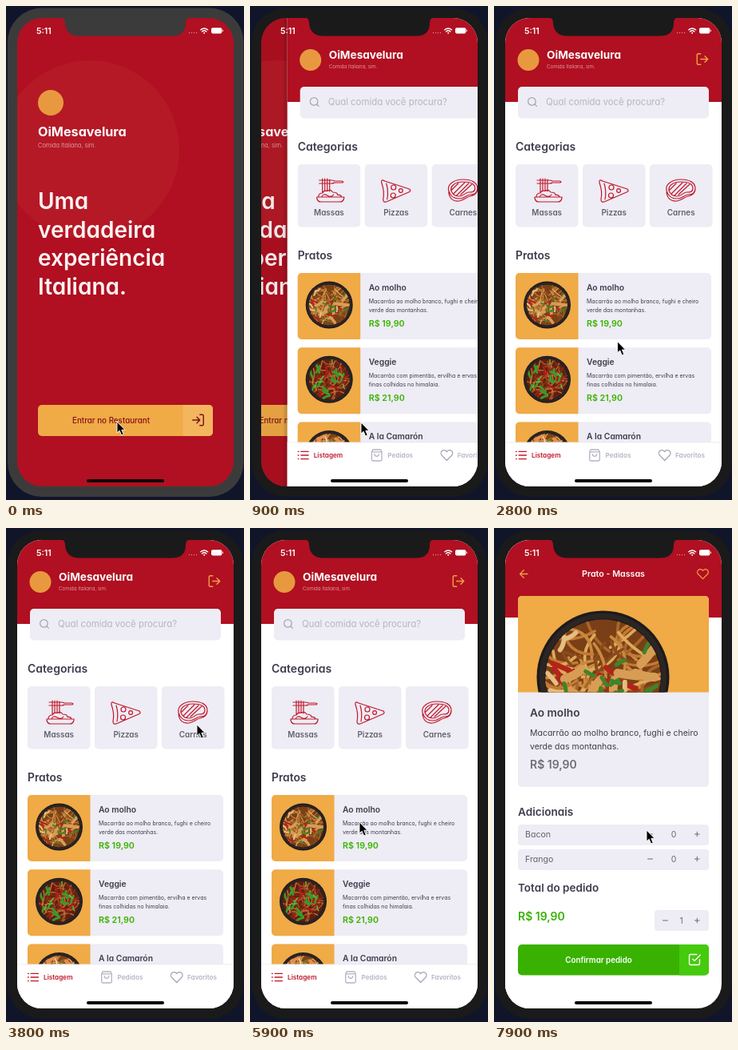
Animation of 298x618 px, one loop 8 s. Source, as an HTML page:

```html
<!DOCTYPE html>
<html lang="pt">
<head>
<meta charset="utf-8">
<title>App de restaurante</title>
<style>
  html, body { margin: 0; width: 100%; height: 100%; overflow: hidden; background: #10152a; }
  svg { display: block; width: 298px; height: 618px; }
  text { font-family: Inter, "Open Sans", sans-serif; font-feature-settings: "cv11"; white-space: pre; }
  .line { fill: none; stroke-linecap: round; stroke-linejoin: round; }
</style>
</head>
<body>
<svg id="stage" viewBox="0 0 298 618" xmlns="http://www.w3.org/2000/svg"></svg>
<script>
const LOOP = 8000, STEP = 100, WIDTH = 271;
const RED = '#b01021', ORANGE = '#f0aa46', GREEN = '#39b100', PANEL = '#eeecf4',
      INK = '#3d3d4d', MUTED = '#b7b4c4', GRAY = '#6a6874', ICON = '#c1182c', AMBER = '#ef9f45';
const BRAND = 'OiMesavelura', TAGLINE = 'Comida Italiana, sim.';

const text = (x, y, size, weight, fill, str, anchor = 'start') =>
  `<text x="${x}" y="${y}" font-size="${size}" font-weight="${weight}" fill="${fill}" text-anchor="${anchor}">${str}</text>`;
const rect = (x, y, w, h, fill, r = 0, extra = '') =>
  `<rect x="${x}" y="${y}" width="${w}" height="${h}" rx="${r}" fill="${fill}" ${extra}/>`;
const circle = (x, y, r, fill) => `<circle cx="${x}" cy="${y}" r="${r}" fill="${fill}"/>`;
const line = (d, color, width = 1.2) =>
  `<path class="line" d="${d}" stroke="${color}" stroke-width="${width}"/>`;

// Icons live on a 24-unit grid and are placed by their centre.
const ICONS = {
  enter: 'M15 3h4a2 2 0 0 1 2 2v14a2 2 0 0 1-2 2h-4M10 17l5-5-5-5M15 12H3',
  leave: 'M9 21H5a2 2 0 0 1-2-2V5a2 2 0 0 1 2-2h4M16 17l5-5-5-5M21 12H9',
  search: 'M19 11a8 8 0 1 1-16 0a8 8 0 0 1 16 0M21 21l-4.3-4.3',
  list: 'M8 5h14M8 12h14M8 19h14M2.5 5h1M2.5 12h1M2.5 19h1',
  bag: 'M5 2L3 6v14a2 2 0 0 0 2 2h14a2 2 0 0 0 2-2V6l-2-4zM3 6h18M16 10a4 4 0 0 1-8 0',
  heart: 'M20.8 4.6a5.5 5.5 0 0 0-7.8 0L12 5.7l-1-1.1a5.5 5.5 0 0 0-7.8 7.8L12 21.2l8.8-8.8a5.5 5.5 0 0 0 0-7.8z',
  back: 'M19 12H5M12 19l-7-7 7-7',
  check: 'M9 11l3 3L22 4M21 12v7a2 2 0 0 1-2 2H5a2 2 0 0 1-2-2V5a2 2 0 0 1 2-2h11'
};
const icon = (name, x, y, scale, color, width = 1.9) =>
  `<g transform="translate(${x} ${y}) scale(${scale}) translate(-12 -12)">${line(ICONS[name], color, width)}</g>`;

function random(seed) {
  return () => (seed = (seed * 16807) % 2147483647) / 2147483647;
}

// A dark bowl of noodles; chunks are [colour, count, length, thickness].
function bowl(id, cx, cy, r, seed, base, strands, chunks) {
  const rnd = random(seed);
  const spot = () => {
    const a = rnd() * Math.PI * 2, d = Math.sqrt(rnd()) * r * 0.8;
    return [cx + Math.cos(a) * d, cy + Math.sin(a) * d];
  };
  const stroke = (color, len, bend, width) => {
    const [x, y] = spot(), a = rnd() * Math.PI * 2;
    const dx = Math.cos(a) * len * r, dy = Math.sin(a) * len * r, k = (rnd() - 0.5) * bend;
    const n = v => v.toFixed(1);
    return line(`M${n(x - dx)} ${n(y - dy)}Q${n(x - dy * k)} ${n(y + dx * k)} ${n(x + dx)} ${n(y + dy)}`, color, n(width * r));
  };
  let out = '';
  for (let i = 0; i < 66; i++) out += stroke(strands[i % strands.length], 0.3, 2.2, 0.045);
  for (const [color, count, len, width] of chunks)
    for (let i = 0; i < count; i++) out += stroke(color, len, 0.8, width);
  return `<clipPath id="${id}"><circle cx="${cx}" cy="${cy}" r="${r * 0.87}"/></clipPath>` +
    circle(cx, cy, r, '#1d1a1a') +
    `<g clip-path="url(#${id})">${circle(cx, cy, r * 0.87, base)}${out}</g>` +
    `<circle cx="${cx}" cy="${cy}" r="${r * 0.92}" fill="none" stroke="#2b2524" stroke-width="${r * 0.08}"/>`;
}
const chickenBowl = (id, x, y, r) => bowl(id, x, y, r, 4127, '#7a3f16',
  ['#c98a3e', '#a9662a', '#dda95c', '#8a4a1b', '#c27a33'],
  [['#b3241a', 9, 0.13, 0.08], ['#d79d55', 9, 0.15, 0.13], ['#e6bd80', 6, 0.1, 0.07], ['#3e8428', 13, 0.07, 0.06]]);
const veggieBowl = (id, x, y, r) => bowl(id, x, y, r, 911, '#5f1f10',
  ['#b5562a', '#8a3318', '#c97438', '#6f2612'],
  [['#a81d16', 8, 0.15, 0.08], ['#3c9a2a', 13, 0.16, 0.09], ['#63bd3f', 6, 0.1, 0.05]]);
const shrimpBowl = (id, x, y, r) => bowl(id, x, y, r, 5309, '#7d4319',
  ['#d29a4c', '#b3702f', '#e2b56c'],
  [['#e88d4c', 11, 0.15, 0.13], ['#f2c9a0', 7, 0.1, 0.06], ['#4a8b2c', 7, 0.06, 0.05]]);

const splash = () =>
  rect(14, 15, WIDTH, 586, RED) +
  circle(105, 180, 112, '#b51926') +
  circle(56, 121, 16, '#e8993f') +
  text(40, 163, 16.2, 700, '#fff', BRAND) +
  text(40, 177.3, 7.4, 300, '#f0b8ba', TAGLINE) +
  ['Uma', 'verdadeira', 'experiência', 'Italiana.'].map((s, i) =>
    text(40, 254 + i * 35.5, 28, 600, '#fdf3f3', s)).join('') +
  rect(40, 499, 219, 39, ORANGE, 5) +
  `<path d="M221.500 499H254a5 5 0 0 1 5 5v29a5 5 0 0 1-5 5h-32.500z" fill="#f3b65f"/>` +
  text(131.5, 522, 9.8, 500, '#84101a', 'Entrar no Restaurant', 'middle') +
  icon('enter', 240.5, 518, 0.75, '#7c1016');

const pasta = () => line('M51 239h34v1.500q-1 4.500-5 4.500H56q-4 0-5-4.500z' +
  'M53 239q0-5 5-5q2-4 6-2.500q4-3 7 1.500q6 0 6 3.500q4-1 5 2.500' +
  'M57 239q2-5 7-2t8-1M58 216v17M61 216v15M64 216v15M67 217v15' +
  'M54 218h15M54 222h15M69 218q3 0 4 1h9q2 0 2 1t-2 1h-9q-1 1-4 1', ICON);
const pizza = () => line('M136 219L167 229q2 2 0 3.500L138 245q-4 1-4-3q2-10-2-21q-1-5 4-2' +
  'M138 222q3 10 1 20M150 227a3 3 0 1 1-6 0a3 3 0 0 1 6 0M149.500 237a3 3 0 1 1-6 0a3 3 0 0 1 6 0' +
  'M158.500 231a2.400 2.400 0 1 1-4.800 0a2.400 2.400 0 0 1 4.800 0', ICON);
const steak = () => line('M216 231c-2-8 7-14 18-14s18 4 18 11-5 8-9 8-6 5-14 5-11-4-13-10z' +
  'M216 233c1 8 6 12 13 11s9-5 14-6 9-4 9-9' +
  'M219 231c-1-6 5-11 15-11s15 3 15 8-4 5-8 5-6 5-12 5-8-3-10-7z' +
  'M222 235l14-14M226 237l15-15M231 236l14-13M220 230l8-8', ICON);

const DISHES = [
  ['Ao molho', 'Macarrão ao molho branco, fughi e cheiro', 'verde das montanhas.', 'R$ 19,90', chickenBowl],
  ['Veggie', 'Macarrão com pimentão, ervilha e ervas', 'finas colhidas no himalaia.', 'R$ 21,90', veggieBowl],
  ['A la Camarón', '', '', '', shrimpBowl]
];

function dish([name, first, second, price, photo], i) {
  const y = 334 + i * 93.2;
  return rect(27, y, 245, 83, PANEL, 5) +
    `<path d="M105.500 ${y}H32a5 5 0 0 0-5 5v73a5 5 0 0 0 5 5h73.500z" fill="${ORANGE}"/>` +
    photo('bowl' + i, 66.5, y + 40, 29.5) +
    text(116, y + 22, 10.3, 600, INK, name) +
    text(116, y + 37.8, 7, 400, INK, first) +
    text(116, y + 48.6, 7, 400, INK, second) +
    text(116, y + 67, 10.7, 600, GREEN, price);
}

const home = () =>
  rect(14, 15, WIDTH, 586, '#fff') +
  rect(14, 15, WIDTH, 105, RED) +
  circle(43, 67.5, 13.5, '#e8993f') +
  text(66, 66, 13.6, 700, '#fff', BRAND) +
  text(66, 78, 6.2, 300, '#f0b8ba', TAGLINE) +
  icon('leave', 261, 66.5, 0.75, AMBER) +
  rect(30, 101, 239, 39.5, PANEL, 5) +
  icon('search', 48, 120, 0.6, '#aaa7b5', 2.1) +
  text(65, 124.4, 11.4, 400, MUTED, 'Qual comida você procura?') +
  text(27, 181, 14, 600, INK, 'Categorias') +
  ['Massas', 'Pizzas', 'Carnes'].map((s, i) =>
    rect(27 + i * 84, 198, 78.5, 78.5, PANEL, 5) +
    text(66.2 + i * 84, 262, 9.9, 600, '#62606c', s, 'middle')).join('') +
  pasta() + pizza() + steak() +
  text(27, 317.3, 13.8, 600, INK, 'Pratos') +
  DISHES.map(dish).join('') +
  rect(14, 546, WIDTH, 55, '#fff') +
  rect(14, 545.5, WIDTH, 0.8, '#e9e8ee') +
  icon('list', 33.8, 562, 0.66, ICON, 2.2) +
  text(47, 565, 8.2, 600, ICON, 'Listagem') +
  icon('bag', 126, 562, 0.7, MUTED) +
  text(139.5, 565, 8.2, 600, MUTED, 'Pedidos') +
  icon('heart', 213.7, 562, 0.7, '#aaa7b8') +
  text(227, 565, 8.2, 600, MUTED, 'Favoritos');

const stepper = (x, y, value) =>
  line(`M${x} ${y}h6M251.500 ${y}h5.500M254.250 ${y - 2.75}v5.500`, GRAY, 1) +
  text(value ? 234.5 : 225, y + 3.7, 10.4, 400, GRAY, value, 'middle');

const extra = (y, name) =>
  rect(30, y, 239, 26, PANEL, 4) +
  text(39, y + 15.6, 10.6, 400, '#65636e', name) +
  stepper(192.5, y + 12, 0);

const details = () =>
  rect(14, 15, WIDTH, 586, '#fff') +
  rect(14, 15, WIDTH, 97, RED) +
  icon('back', 37.3, 57.5, 0.68, AMBER) +
  text(149.5, 61.3, 10.7, 600, '#fff', 'Prato - Massas', 'middle') +
  icon('heart', 261.5, 57.5, 0.66, AMBER) +
  rect(30, 85, 239, 239, PANEL, 5) +
  `<clipPath id="hero"><path d="M30 205.500V90a5 5 0 0 1 5-5h229a5 5 0 0 1 5 5v115.500z"/></clipPath>` +
  `<g clip-path="url(#hero)">${rect(30, 85, 239, 121, ORANGE)}${chickenBowl('bigBowl', 136.5, 186.5, 83)}</g>` +
  text(45, 235.7, 13.7, 600, INK, DISHES[0][0]) +
  text(45, 260.3, 10.5, 400, INK, DISHES[0][1]) +
  text(45, 277, 10.5, 400, INK, DISHES[0][2]) +
  text(45, 301, 14, 600, '#6f6c78', DISHES[0][3]) +
  text(30, 359.6, 13.6, 600, INK, 'Adicionais') +
  extra(371, 'Bacon') + extra(402, 'Frango') +
  text(30, 455.4, 13.5, 600, INK, 'Total do pedido') +
  text(30, 491.3, 14, 600, GREEN, DISHES[0][3]) +
  rect(201, 478, 68, 26, PANEL, 4) + stepper(211.5, 491, 1) +
  rect(30, 521, 239, 38.5, GREEN, 5) +
  `<path d="M232 521h32a5 5 0 0 1 5 5v28.500a5 5 0 0 1-5 5h-32z" fill="#45ca0d"/>` +
  text(131, 543.8, 9.8, 600, '#fff', 'Confirmar pedido', 'middle') +
  icon('check', 251, 540, 0.72, '#fff');

const edge = rect(8, 15, 6, 586, 'url(#edge)');
const dim = id => rect(14, 15, WIDTH, 586, '#000', 0, `id="${id}" opacity="0"`);

const statusBar = () =>
  text(38, 35, 10.6, 600, '#fff', '5:11') +
  [0, 1, 2, 3].map(i => circle(229.5 + i * 3, 33.5, 0.7, '#d98a90')).join('') +
  line('M243.800 29.800q4.400-3.800 8.800 0M245.500 32q2.700-2.300 5.400 0', '#fff', 1.4) +
  circle(248.2, 33.8, 1, '#fff') +
  rect(257, 27.2, 13.4, 7.2, '#fff', 1.8) + rect(271, 29.5, 1, 2.6, '#f2d5d7', 0.5);

document.getElementById('stage').innerHTML = `
  <defs>
    <linearGradient id="edge"><stop offset="0" stop-opacity="0"/><stop offset="1" stop-opacity=".18"/></linearGradient>
    <clipPath id="screen"><rect x="14" y="15" width="${WIDTH}" height="586" rx="31"/></clipPath>
  </defs>
  ${rect(0, 0, 298, 618, '#10152a')}
  <rect id="body" x="2" y="2.500" width="295.500" height="611.500" rx="43"/>
  <g clip-path="url(#screen)">
    <g id="splash">${splash()}</g>${dim('dimSplash')}
    <g id="home">${edge}${home()}</g>${dim('dimHome')}
    <g id="details">${edge}${details()}</g>
    ${statusBar()}
    ${rect(101, 592, 97, 4, '#0b0507', 2)}
  </g>
  <path id="notch" d="M68 14Q74 15 74 21Q75 37.500 92 37.500H208Q225 37.500 225 21Q225 15 231 14Z"/>
  <path id="pointer" d="M0 0V14L3.200 11.200L5.600 17L8.200 15.900L5.800 10.300H10Z" fill="#000" stroke="#fff" stroke-width=".9" stroke-linejoin="round"/>`;

const $ = id => document.getElementById(id);
const move = (id, x, y = 0) => $(id).setAttribute('transform', `translate(${x.toFixed(2)} ${y.toFixed(2)})`);

// Critically damped spring, 0 to 1.
const OMEGA = Math.sqrt(1000 / 3);
function spring(ms) {
  if (ms <= 0) return 0;
  const u = OMEGA * ms / 1000, left = (1 + u) * Math.exp(-u);
  return left < 0.001 ? 1 : 1 - left;
}

function push(under, over, shade, p) {
  $(over).style.display = p ? '' : 'none';
  if (p) move(over, WIDTH * (1 - p));
  $(shade).setAttribute('opacity', 0.06 * p * (p < 1));
  return -0.3 * WIDTH * p;
}

// Pointer stops: time, x, y.
const STOPS = [[0, 139, 520], [1000, 139, 521], [1800, 132, 466], [2500, 137, 456], [3600, 239, 246],
  [4800, 239, 246], [5900, 137, 368], [6300, 142, 370], [7300, 142, 370], [7900, 191, 378]];

function pointerAt(t) {
  const i = STOPS.findIndex(s => s[0] > t);
  if (i < 0) return STOPS[STOPS.length - 1].slice(1);
  const a = STOPS[i - 1], b = STOPS[i], k = (t - a[0]) / (b[0] - a[0]);
  const e = (1 - Math.cos(Math.PI * k)) / 2;
  return [a[1] + (b[1] - a[1]) * e, a[2] + (b[2] - a[2]) * e];
}

function draw(t) {
  const shell = t < 400 ? '#3b3b3b' : '#1a1a1b';
  $('body').setAttribute('fill', shell);
  $('notch').setAttribute('fill', shell);
  move('splash', push('splash', 'home', 'dimSplash', spring(t - 700)));
  const slide = push('home', 'details', 'dimHome', spring(t - 6733));
  if (slide) move('home', slide);
  move('pointer', ...pointerAt(t));
}

function tick() {
  const t = (performance.now() + 8) % LOOP;
  draw(Math.floor(t / STEP) * STEP);
  requestAnimationFrame(tick);
}
tick();
</script>
</body>
</html>
```
